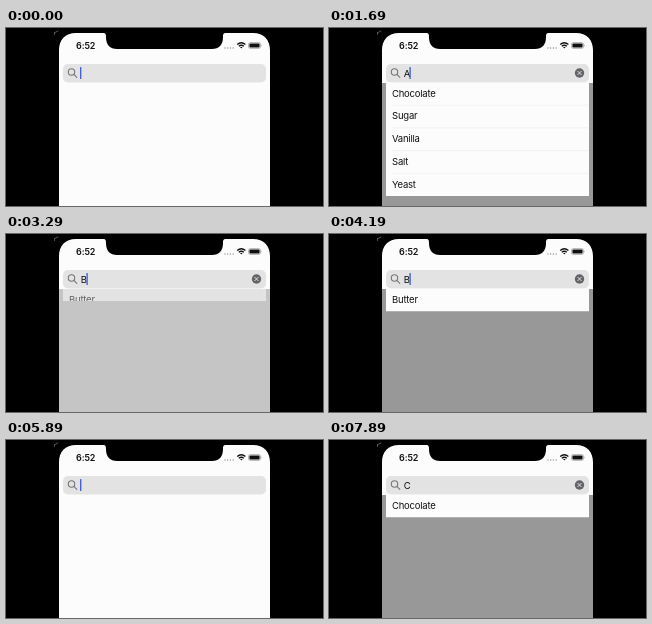
An HTML page for the animation above (7990 ms loop, 317 by 178 pixels).

```html
<!DOCTYPE html>
<html lang="en">
<head>
<meta charset="utf-8">
<title>Ingredient search</title>
<style>
  html, body { margin: 0; width: 100%; height: 100%; overflow: hidden; background: #000; }
  svg { display: block; width: 317px; height: 178px; }
  text { font-family: Inter, "Liberation Sans", sans-serif; font-size: 9.5px; letter-spacing: -.22px; fill: #111; }
  .clock { font-size: 9px; font-weight: 600; letter-spacing: -.1px; }
  .line { fill: none; stroke-linecap: round; }
</style>
</head>
<body>
<svg viewBox="0 0 317 178">
  <defs>
    <clipPath id="screen">
      <path d="M53 178V22C53 12 59 5 70 5H97C100 5 100 7 100 9C100 17 104 21 111 21H206C213 21 217 17 217 9C217 7 217 5 220 5H247C258 5 264 12 264 22V178Z"/>
    </clipPath>
    <clipPath id="reveal"><rect id="window" x="57" y="54.5" width="203" height="0"/></clipPath>
  </defs>
  <rect width="317" height="178"/>
  <path class="line" d="M48.5 4.5v2M49 4.5l3-1.5" stroke="#777" stroke-width=".7"/>

  <g clip-path="url(#screen)">
    <rect x="53" width="211" height="178" fill="#fcfcfc"/>
    <rect id="shade" x="53" y="55" width="211" height="123" opacity="0"/>

    <text class="clock" x="70" y="20.6">6:52</text>
    <g fill="#999">
      <circle cx="219" cy="20" r=".75"/><circle cx="221.7" cy="20" r=".75"/>
      <circle cx="224.4" cy="20" r=".75"/><circle cx="227.1" cy="20" r=".75"/>
    </g>
    <g class="line" stroke="#111" stroke-width="1.3" style="stroke-linecap:butt">
      <path d="M231.2 16.6Q235.3 13 239.4 16.6M232.8 18.3Q235.3 16.2 237.8 18.3"/>
      <path d="M234 19.1h2.6l-1.3 1.4z" fill="#111" stroke="none"/>
    </g>
    <rect x="242.5" y="14.6" width="12" height="5.8" rx="1.7" fill="none" stroke="#888" stroke-width=".6"/>
    <rect x="243.4" y="15.5" width="10.2" height="4" rx="1" fill="#111"/>
    <path d="M255.3 16.5q1.2 1 0 2z" fill="#888"/>

    <rect x="57" y="36" width="203" height="18.5" rx="5" fill="#e3e3e4"/>
    <g class="line" stroke="#77777b" stroke-width="1.1">
      <circle cx="65.5" cy="44" r="3.2"/><path d="M67.9 46.4l2.9 2.9"/>
    </g>
    <text id="query" x="74.7" y="48.5"></text>
    <rect id="caret" x="74" y="39" width="1.4" height="12" rx=".6" fill="#4560d8"/>
    <g id="clear">
      <circle cx="250.5" cy="45" r="4.7" fill="#646468"/>
      <path class="line" d="M248.8 43.3l3.4 3.4M252.2 43.3l-3.4 3.4" stroke="#eee" stroke-width=".9"/>
    </g>

    <g id="panel" clip-path="url(#reveal)">
      <rect x="57" y="54.5" width="203" height="114" fill="#fcfcfc"/>
      <g id="rows"></g>
    </g>
  </g>
</svg>
<script>
const LOOP = 7990, FADE = 300, ROW = 22.7, DIM = 0.4;
const foods = ["Chocolate", "Sugar", "Vanilla", "Butter", "Salt", "Yeast"];
// time, search text, caret x
const edits = [
  [-200, "", 74],
  [230, "A", 80.4],
  [1930, "", 74],
  [3130, "B", 80.4],
  [4335, "", 74],
  [6150, "C", 81]
];

const $ = id => document.getElementById(id);
const set = (id, name, value) => $(id).setAttribute(name, value);
const clamp = x => Math.min(1, Math.max(0, x));
const ease = x => x * x * (3 - 2 * x);

// Ten pictures per second, with one short and one long step
function snap(t) {
  if (t < 80) return 0;
  const start = t < 1680 ? 80 : 90;
  return start + 100 * Math.floor((t - start) / 100);
}

function matches(query) {
  return query ? foods.filter(f => f.toLowerCase().includes(query.toLowerCase())) : [];
}

let shown = null;
function fillRows(query, list) {
  if (query === shown) return;
  shown = query;
  $("query").textContent = query;
  $("rows").innerHTML = list.map((food, i) => {
    const y = 54.5 + i * ROW;
    const rule = i ? `<path d="M63 ${y}H260" stroke="#e9e9e9" stroke-width=".6"/>` : "";
    return `${rule}<text x="63" y="${y + 14.2}">${food}</text>`;
  }).join("");
}

function draw(t) {
  const [at, query, caretX] = edits.filter(e => e[0] <= t).pop();
  const age = t - at;
  const p = ease(clamp(age / FADE));
  const list = matches(query);
  fillRows(query, list);

  const shade = query ? p : at < 0 ? 0 : 1 - p;
  set("shade", "opacity", DIM * shade);
  set("panel", "opacity", query ? p : 0);
  set("window", "height", list.length * ROW * p);
  set("clear", "opacity", query ? 1 : 0);

  const beat = age % 1000;
  set("caret", "x", caretX);
  set("caret", "opacity", beat < 600 ? 1 : beat < 700 ? (700 - beat) / 100 : clamp((beat - 900) / 100));
}

const began = performance.now();
function tick() {
  draw(snap((performance.now() - began) % LOOP));
  requestAnimationFrame(tick);
}
tick();
</script>
</body>
</html>
```
